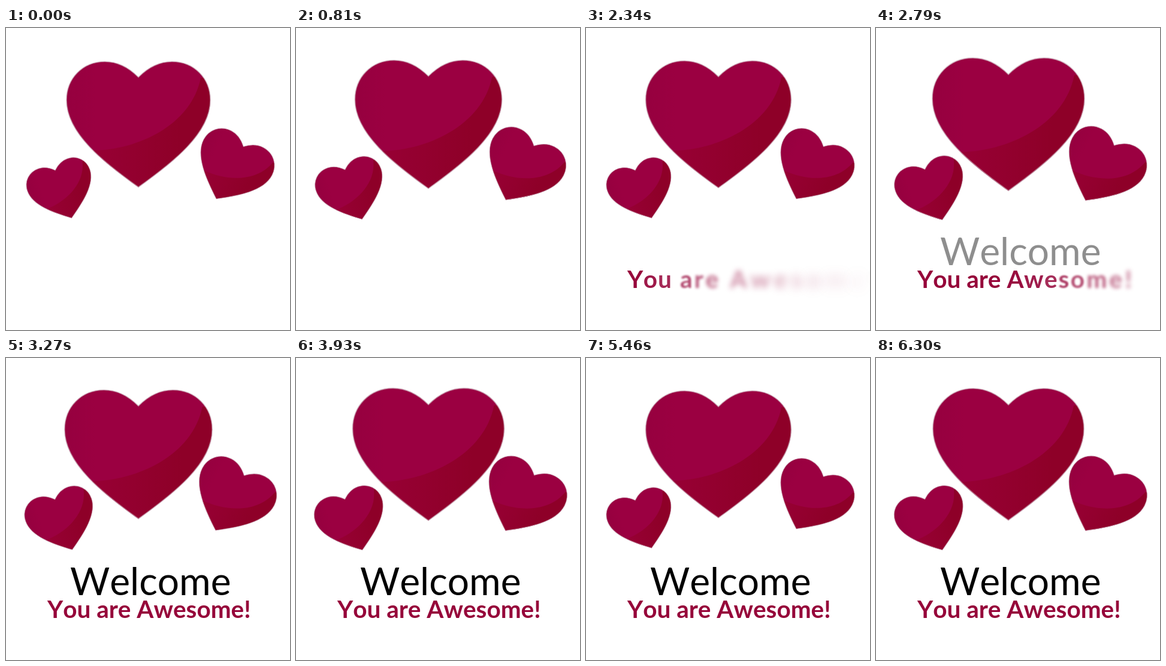
Recreate the animation shown at these times as an HTML page with a canvas. Size 474 by 503 pixels, loop 6.33 s.

```html
<!DOCTYPE html>
<html lang="en">
<head>
<meta charset="utf-8">
<title>Welcome hearts</title>
<style>
html, body { margin: 0; width: 100%; height: 100%; overflow: hidden; background: #fff; }
canvas { display: block; width: 474px; height: 503px; }
</style>
</head>
<body>
<canvas id="stage" width="474" height="503"></canvas>
<script>
const ctx = document.getElementById('stage').getContext('2d');
const LOOP = 6330, STEP = 30, HOLD = 90, BEAT = 600;
const INK = '#96063a';
const FACE = 'Lato, "Open Sans", sans-serif';

// Heart with its tip at the origin
const heart = new Path2D(
  'M0 -183C-18 -201 -37 -209 -56 -209C-93 -209 -120 -181 -120 -145' +
  'C-120 -89 -56 -40 0 0C56 -40 120 -89 120 -145' +
  'C120 -181 93 -209 56 -209C37 -209 18 -201 0 -183Z');
const shade = new Path2D('M-75 -61C-3 -62 88 -102 104 -182L150 -182L150 20L-120 20Z');

function blend(x0, x1, from, to) {
  const g = ctx.createLinearGradient(x0, 0, x1, 0);
  g.addColorStop(0, from);
  g.addColorStop(1, to);
  return g;
}
const MAIN = blend(-120, -70, '#96003f', '#9b0041');
const SHADE = blend(-70, 70, '#970034', '#8e0028');

// Beat curves: [phase, swell]
const bigBeat = [[0, 0], [.1, .2], [.45, .45], [.5, .87], [.6, 1], [.7, 1], [.9, .2], [1, 0]];
const smallBeat = [[0, 0], [.1, .02], [.45, .85], [.5, 1], [.6, 1], [.7, .85], [.9, .02], [1, 0]];

const hearts = [
  { tip: [221, 265], pivot: [221, 160.5], size: 1, tilt: 0, grow: .058, beat: bigBeat, rim: 1.6 },
  { tip: [109.5, 316.5], pivot: [91, 265], size: .459, tilt: -19, grow: .065, beat: smallBeat, rim: 1 },
  { tip: [351, 284.5], pivot: [374, 234], size: .536, tilt: 27.5, grow: .06, beat: smallBeat, rim: 1 }
];

const clamp = v => Math.min(1, Math.max(0, v));

function sample(curve, x) {
  const i = curve.findIndex(k => k[0] > x);
  const [x0, y0] = curve[i - 1], [x1, y1] = curve[i];
  return y0 + (y1 - y0) * (x - x0) / (x1 - x0);
}

function drawHeart(h, t) {
  const s = 1 + h.grow * sample(h.beat, t % BEAT / BEAT);
  ctx.save();
  ctx.translate(...h.pivot);
  ctx.scale(s, s);
  ctx.translate(h.tip[0] - h.pivot[0], h.tip[1] - h.pivot[1]);
  ctx.rotate(h.tilt * Math.PI / 180);
  ctx.scale(h.size, h.size);
  ctx.fillStyle = MAIN;
  ctx.fill(heart);
  ctx.save();
  ctx.clip(heart);
  ctx.fillStyle = SHADE;
  ctx.fill(shade);
  ctx.restore();
  ctx.strokeStyle = 'rgba(200,165,180,.7)';
  ctx.lineWidth = h.rim / h.size;
  ctx.stroke(heart);
  ctx.restore();
}

// Letters glide in from the right, one after another, losing their blur
function drawLine(t) {
  const start = 1450, stagger = 58, length = 900;
  let x = 69;
  ctx.font = 'bold 40.5px ' + FACE;
  ctx.fillStyle = INK;
  [...'You are Awesome!'].forEach((ch, i) => {
    const p = clamp((t - start - i * stagger) / length), q = 1 - p;
    if (p > 0) {
      const blur = 12 * q ** 1.5;
      ctx.globalAlpha = p;
      ctx.filter = blur > .1 ? `blur(${blur.toFixed(2)}px)` : 'none';
      ctx.fillText(ch, x + 80 * q * q, 433);
    }
    x += ctx.measureText(ch).width;
  });
  ctx.filter = 'none';
  ctx.globalAlpha = 1;
}

function drawTitle(t) {
  const p = clamp((t - 2600) / 750);
  ctx.globalAlpha = 1 - (1 - p) ** 2;
  ctx.font = '64px ' + FACE;
  ctx.fillStyle = '#000';
  ctx.fillText('Welcome', 107, 395);
  ctx.globalAlpha = 1;
}

function draw(now) {
  const raw = now % LOOP;
  const t = raw < HOLD ? 0 : Math.floor(raw / STEP) * STEP;
  ctx.fillStyle = '#fff';
  ctx.fillRect(0, 0, 474, 503);
  ctx.fontKerning = 'none';
  hearts.forEach(h => drawHeart(h, t));
  drawTitle(t);
  drawLine(t);
}

const begin = performance.now();
function tick() {
  draw(performance.now() - begin);
  requestAnimationFrame(tick);
}
tick();
</script>
</body>
</html>
```
